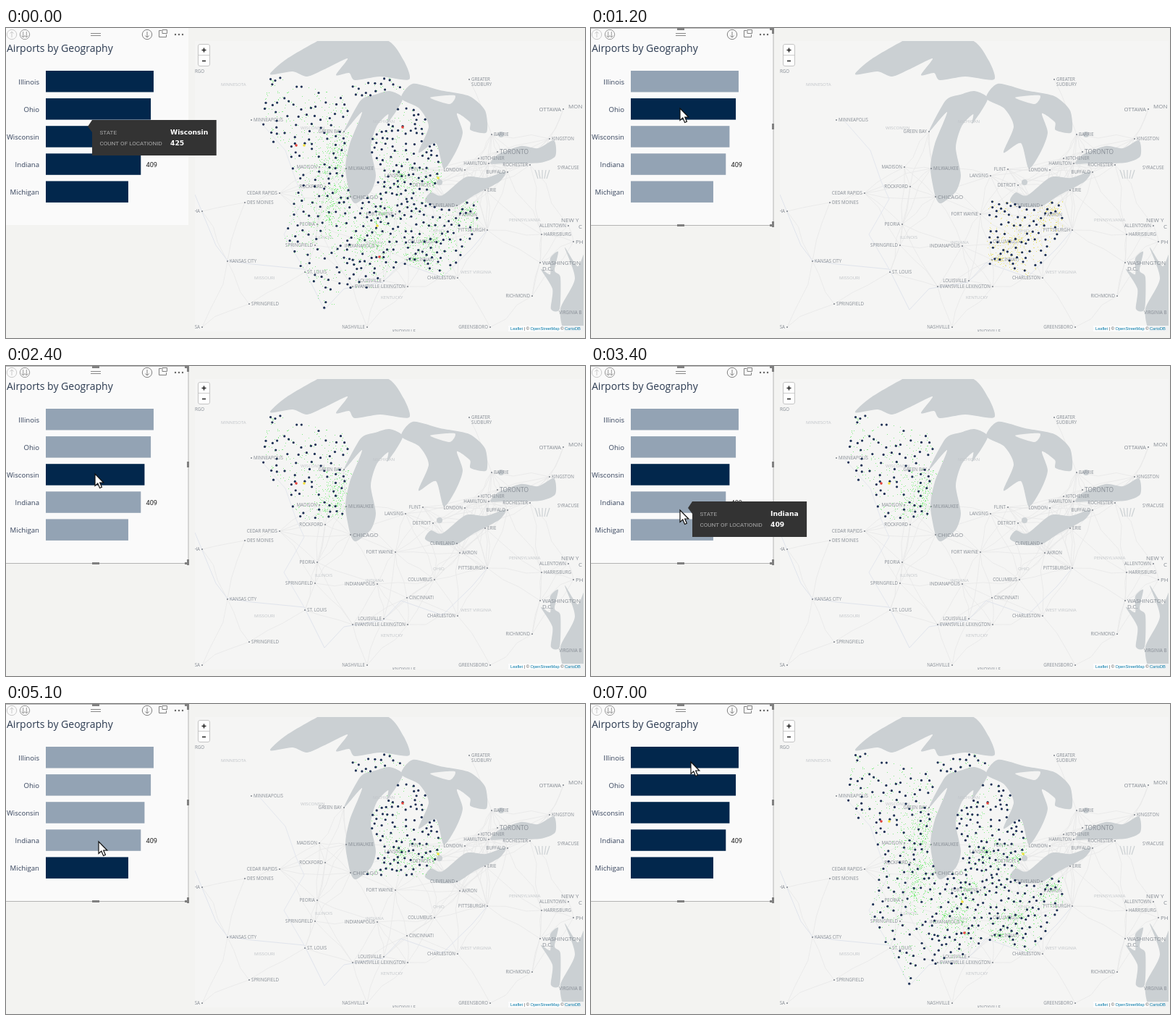
Recreate the animation shown at these times as an HTML page with a canvas. Size 800x428 px, loop 7.1 s.

```html
<!DOCTYPE html>
<html lang="en">
<head>
<meta charset="utf-8">
<title>Airports by Geography</title>
<style>
html, body { margin: 0; width: 100%; height: 100%; overflow: hidden; background: #f3f3f1; }
canvas { display: block; width: 800px; height: 428px; }
</style>
</head>
<body>
<canvas id="stage" width="800" height="428"></canvas>
<script>
const LOOP = 7100, STEP = 100;
const W = 800, H = 428, TAU = Math.PI * 2;
const NAVY = '#02274c', DIMMED = '#93a3b4', WATER = '#cbd0d3';
const GREEN = '#84ee84', YELLOW = '#ece474';
const SANS = '"Open Sans", sans-serif';
const ctx = document.getElementById('stage').getContext('2d');

function layer(draw) {
  const canvas = document.createElement('canvas');
  canvas.width = W;
  canvas.height = H;
  draw(canvas.getContext('2d'));
  return canvas;
}

function randomizer(seed) {
  return () => {
    seed = (seed + 0x6d2b79f5) | 0;
    let v = Math.imul(seed ^ (seed >>> 15), 1 | seed);
    v = (v + Math.imul(v ^ (v >>> 7), 61 | v)) ^ v;
    return ((v ^ (v >>> 14)) >>> 0) / 4294967296;
  };
}

const points = text => text.split(' ').map(p => p.split(',').map(Number));
const outline = (...rings) => new Path2D(rings.map(r => `M${r}Z`).join(' '));

// Closed Catmull-Rom curve through a few key points.
function shore(text) {
  const pts = points(text), n = pts.length, path = new Path2D();
  const at = i => pts[(i + n) % n];
  const handle = (a, b, c, k) => [0, 1].map(d => b[d] + k * (c[d] - a[d]) / 8);
  path.moveTo(...pts[0]);
  pts.forEach((p, i) => path.bezierCurveTo(
    ...handle(at(i - 1), p, at(i + 1), 1),
    ...handle(p, at(i + 1), at(i + 2), -1), ...at(i + 1)));
  return path;
}

function write(c, text, x, y, font, color, align = 'left') {
  c.font = font;
  c.fillStyle = color;
  c.textAlign = align;
  c.fillText(text, x, y);
}

function line(c, color, width, ...pts) {
  c.strokeStyle = color;
  c.lineWidth = width;
  c.beginPath();
  pts.forEach(([x, y]) => c.lineTo(x, y));
  c.stroke();
}

function disc(c, x, y, r, color) {
  c.fillStyle = color;
  c.beginPath();
  c.arc(x, y, r, 0, TAU);
  c.fill();
}

// ---- Geography ----

const waters = [
  '365,64 386,44 425,21 445,14 524,16 549,44 557,71 517,67 482,72 474,62 456,65 472,42 440,57 416,67 396,60',
  '476,233 484,242 504,226 511,203 504,165 512,136 528,119 527,132 548,98 530,87 510,92 490,100 467,143 492,116 475,160 469,194',
  '546,97 571,111 584,136 570,172 594,159 605,194 622,170 631,144 623,118 641,130 642,141 664,144 662,114 640,94 600,86 562,77',
  '579,239 587,227 603,231 635,206 663,207 690,198 682,212 645,232 623,246 598,247',
  '669,187 681,174 711,163 735,166 757,155 759,177 738,186 688,187',
  '763,309 758,335 766,344 765,388 753,388 755,360 739,333 752,340 752,318',
  '772,303 790,329 802,310 802,421 773,421 766,388 786,346'
].map(shore);
const island = shore('586,96 620,93 613,105');

// Outlines may overlap water; the scatter keeps dots on land.
const states = {
  Illinois: {
    count: 464, airports: 64, speck: YELLOW, hubs: points('457,222 446,262'),
    area: outline('401,212 478,211 481,244 481,300 467,358 450,387 438,386 384,290 392,259')
  },
  Ohio: {
    count: 452, airports: 76, speck: YELLOW, hubs: points('637,250 564,318 592,292'),
    area: outline('547,238 652,237 652,275 620,328 603,342 546,324')
  },
  Wisconsin: {
    count: 425, airports: 76, speck: GREEN, hubs: points('457,192 440,198 455,165'),
    area: outline('366,64 464,93 472,112 494,112 471,210 401,211 349,127 347,105')
  },
  Indiana: {
    count: 409, airports: 60, speck: GREEN, hubs: points('513,300 520,256 488,292'),
    area: outline('481,240 547,238 546,322 504,358 477,361 470,358 480,316')
  },
  Michigan: {
    count: 355, airports: 108, speck: GREEN, hubs: points('588,212 545,205'),
    area: outline('497,237 500,160 545,98 586,130 606,165 605,200 579,238', '470,78 545,66 556,84 490,99')
  }
};
const names = Object.keys(states);

const marks = [
  ['Wisconsin', 401, 162, '#e8403c'], ['Wisconsin', 412, 162, '#f2e03a'], ['Indiana', 513, 273, '#f2e03a'],
  ['Indiana', 516, 316, '#e8403c'], ['Michigan', 548, 137, '#e8403c'], ['Michigan', 597, 207, '#f2e03a']
];

function scatter({ area, hubs, count, airports }, random) {
  const onLand = ([x, y]) => ctx.isPointInPath(area, x, y) && !waters.some(w => ctx.isPointInPath(w, x, y));
  const anywhere = () => [345 + random() * 310, 45 + random() * 345];
  const nearHub = () => {
    const [x, y] = hubs[Math.floor(random() * hubs.length)];
    const r = 30 * random(), a = TAU * random();
    return [x + r * Math.cos(a), y + r * Math.sin(a)];
  };
  const fill = (total, pick, gap) => {
    const found = [];
    for (let tries = 0; found.length < total && tries < 20000; tries++) {
      const p = pick();
      if (onLand(p) && found.every(q => Math.hypot(q[0] - p[0], q[1] - p[1]) >= gap)) found.push(p);
    }
    return found;
  };
  return {
    specks: fill(count, () => random() < 0.13 ? nearHub() : anywhere(), 0),
    fields: fill(airports, anywhere, 6)
  };
}

function drawDots(c, name, speckColor) {
  const { specks, fields } = states[name].dots;
  c.fillStyle = speckColor;
  specks.forEach(([x, y]) => c.fillRect(Math.round(x), Math.round(y), 1, 1));
  fields.forEach(([x, y]) => disc(c, x, y, 1.6, '#1d3054'));
  marks.filter(m => m[0] === name).forEach(([, x, y, color]) => disc(c, x, y, 1.8, color));
}

// Name, marker position, side of the label, optional larger size.
const cities = [
  ['MINNEAPOLIS', 339, 127, 1], ['GREEN BAY', 467, 143, -1], ['MADISON', 433, 192, -1], ['MILWAUKEE', 470, 194, 1],
  ['ROCKFORD', 441, 219, -1], ['CHICAGO', 476, 233, 1, 8], ['CEDAR RAPIDS', 378, 228, -1], ['DES MOINES', 330, 241, 1],
  ['PEORIA', 430, 271, -1], ['FORT WAYNE', 538, 257, -1], ['INDIANAPOLIS', 513, 301, -1], ['SPRINGFIELD', 427, 300, -1],
  ['KANSAS CITY', 306, 322, 1], ['ST. LOUIS', 413, 337, 1], ['SPRINGFIELD', 336, 381, 1], ['NASHVILLE', 499, 413, -1],
  ['LOUISVILLE', 522, 349, -1], ['EVANSVILLE', 479, 357, 1], ['LEXINGTON', 555, 357, -1], ['CINCINNATI', 554, 320, 1],
  ['COLUMBUS', 592, 295, -1], ['CLEVELAND', 623, 245, -1], ['AKRON', 627, 258, 1], ['PITTSBURGH', 665, 279, -1],
  ['DETROIT', 590, 217, -1], ['FLINT', 576, 195, -1], ['LANSING', 552, 204, -1], ['LONDON', 634, 196, -1],
  ['ERIE', 662, 224, 1], ['BUFFALO', 693, 199, -1], ['HAMILTON', 667, 187, -1], ['KITCHENER', 653, 180, 1],
  ['TORONTO', 679, 171, 1, 8.4], ['ROCHESTER', 724, 189, -1], ['KINGSTON', 751, 153, 1], ['BARRIE', 671, 147, 1],
  ['OTTAWA', 770, 112, -1, 7.8], ['ALLENTOWN', 777, 273, -1], ['HARRISBURG', 740, 285, 1], ['PH', 784, 295, 1, 8],
  ['WASHINGTON', 738, 324, 1, 8], ['CHARLESTON', 624, 345, -1], ['RICHMOND', 727, 370, -1], ['GREENSBORO', 669, 413, -1],
  ['HA', 271, 253, -1], ['SA', 271, 413, -1], ['GREATER', 640, 71, 1]
];
const places = [
  ['RGO', 261, 62], ['SUDBURY', 643, 80], ['SYRACUSE', 762, 195], ['VIRGINIA B', 764, 395], ['KNOXVILLE', 534, 421],
  ['MON', 777, 111, 8], ['NEW Y', 767, 268, 8], ['C', 791, 277, 8], ['D.C.', 741, 335, 8]
];
const regions = [
  ['MINNESOTA', 297, 80], ['WISCONSIN', 407, 140], ['MICHIGAN', 507, 131], ['ILLINOIS', 427, 291], ['INDIANA', 497, 298],
  ['OHIO', 590, 282], ['MISSOURI', 343, 347], ['KENTUCKY', 518, 374], ['WEST VIRGINIA', 628, 339], ['PENNSYLVANIA', 695, 267]
];

function drawRoads(c, random) {
  cities.forEach(([, x, y], i) => cities.slice(i + 1).forEach(([, u, v]) => {
    const reach = Math.hypot(u - x, v - y);
    if (reach > 100 || reach < 12) return;
    const along = k => [x + (u - x) * k, y + (v - y) * k].map(p => p + (random() - 0.5) * reach * 0.12);
    line(c, '#e8e8e7', 0.8, [x, y], along(1 / 3), along(2 / 3), [u, v]);
  }));
}

function drawMap(c) {
  c.beginPath();
  c.rect(261, 18, 537, 401);
  c.clip();
  c.fillStyle = '#f5f5f4';
  c.fillRect(261, 18, 537, 401);
  drawRoads(c, randomizer(12));
  c.lineJoin = 'round';
  line(c, '#e0e4ec', 1, ...points('261,230 290,300 306,321 340,326 412,333 440,389 467,360 521,351 546,324 603,344 644,304 665,279'));
  line(c, '#e4e7ee', 1, ...points('349,127 386,169 401,212 412,236 384,285 412,333'));
  c.fillStyle = WATER;
  waters.forEach(w => c.fill(w));
  disc(c, 599, 213, 4, WATER);
  disc(c, 684, 147, 4, WATER);
  for (let i = 0; i < 5; i++) line(c, WATER, 1.2, [731 + i * 5, 196], [735 + i * 3, 208]);
  c.fillStyle = '#f3f3f2';
  c.fill(island);

  regions.forEach(([text, x, y]) => write(c, text, x, y, `6.1px ${SANS}`, '#c0c4c8'));
  cities.forEach(([text, x, y, side, size = 6.2]) => {
    disc(c, x, y, 1, '#7f858c');
    write(c, text, x + side * 3, y + size * 0.38, `${size}px ${SANS}`, '#868c94', side > 0 ? 'left' : 'right');
  });
  places.forEach(([text, x, y, size = 6.2]) => write(c, text, x, y, `${size}px ${SANS}`, '#868c94'));
}

function drawMapControls(c) {
  c.fillStyle = '#fff';
  c.strokeStyle = '#c4c4c4';
  c.lineWidth = 1;
  c.beginPath();
  c.roundRect(265.5, 22.5, 16, 30, 2.5);
  c.fill();
  c.stroke();
  line(c, '#ccc', 1, [266, 37.5], [281, 37.5]);
  line(c, '#222', 1.5, [270.5, 30.5], [276.5, 30.5]);
  line(c, '#222', 1.5, [273.5, 27.5], [273.5, 33.5]);
  line(c, '#222', 1.5, [271, 45.5], [276, 45.5]);

  c.fillStyle = 'rgba(255,255,255,.7)';
  c.fillRect(694, 411, 104, 8);
  let x = 697;
  ['Leaflet', ' | © ', 'OpenStreetMap', ' © ', 'CartoDB'].forEach((text, i) => {
    write(c, text, x, 417, '5.7px "Liberation Sans", sans-serif', i % 2 ? '#444' : '#0078a8');
    x += c.measureText(text).width;
  });
}

// ---- Chart card ----

const rowTop = i => 59 + i * 38.1;

function arrow(c, x, dir, color) {
  line(c, color, 1, [x, 5], [x, 13]);
  line(c, color, 1, [x - 2.5, 9 + dir * 1.5], [x, 9 + dir * 4], [x + 2.5, 9 + dir * 1.5]);
}

function roundButton(c, x, color, dir, ...offsets) {
  c.strokeStyle = color;
  c.lineWidth = 1;
  c.beginPath();
  c.arc(x, 9, 6.7, 0, TAU);
  c.stroke();
  offsets.forEach(dx => arrow(c, x + dx, dir, color));
}

function drawCard(c) {
  c.fillStyle = '#fafafa';
  c.fillRect(0, 0, 252, 272);
  roundButton(c, 8, '#c9c9c9', -1, 0);
  roundButton(c, 26, '#999', 1, -2.3, 2.3);
  roundButton(c, 195, '#808080', 1, 0);
  [7.5, 10.5].forEach(y => line(c, '#888', 1, [117, y], [131, y]));
  line(c, '#808080', 1, [215, 3.5], [211.5, 3.5], [211.5, 12.5], [221.5, 12.5], [221.5, 9]);
  line(c, '#808080', 1, [216, 2.5], [222.5, 2.5], [222.5, 7.5], [216, 7.5], [216, 2.5]);
  [234, 239, 244].forEach(x => disc(c, x, 9, 1.2, '#666'));
  write(c, 'Airports by Geography', 1, 33, `14px ${SANS}`, '#2b3a50');
  names.forEach((name, i) => write(c, name, 46, rowTop(i) + 19, `9.6px ${SANS}`, '#33415a', 'right'));
  write(c, '409', 193.5, 192, '9.2px Roboto, sans-serif', '#222');
}

function drawFrame(c) {
  line(c, '#b4b4b4', 1, [0, 0.5], [252, 0.5], [252, 272.5], [0, 272.5]);
  c.fillStyle = '#808080';
  [0, 271].forEach(y => {
    c.fillRect(119, y, 10, 3);
    c.fillRect(247, y, 6, 3);
  });
  [0, 132, 267].forEach(y => c.fillRect(250, y, 3, 8));
}

function drawBars(selected) {
  names.forEach((name, i) => {
    ctx.fillStyle = !selected || selected === name ? NAVY : DIMMED;
    ctx.fillRect(55, rowTop(i), states[name].count * 0.321, 29.5);
  });
}

function drawTooltip(name, x, y) {
  const bold = 'bold 9.2px "DejaVu Sans", sans-serif';
  ctx.font = bold;
  const width = 119.5 + ctx.measureText(name).width;
  ctx.fillStyle = '#333';
  ctx.fillRect(x, y, width, 49);
  ctx.fill(outline(`${x},${y} ${x - 6},${y + 9} ${x},${y + 17}`));
  [['STATE', name], ['COUNT OF LOCATIONID', states[name].count]].forEach(([label, value], i) => {
    const base = y + 20 + i * 14.5;
    write(ctx, label, x + 10.5, base, '8.1px Roboto, sans-serif', '#a9a9a9');
    write(ctx, value, x + 108, base, bold, '#fff');
  });
}

const arrowhead = outline('0,0 0,16.5 3.8,13 6.6,19.5 9.4,18.2 6.7,12 11.8,12');

function drawPointer(x, y) {
  ctx.save();
  ctx.translate(x, y);
  ctx.fillStyle = '#fff';
  ctx.strokeStyle = '#111';
  ctx.lineWidth = 1.2;
  ctx.fill(arrowhead);
  ctx.stroke(arrowhead);
  ctx.restore();
}

// ---- Timeline ----

const TRAVEL = 300, MAP_DELAY = 200, CLEAR = 6600;
const stops = [
  { state: 'Wisconsin', at: 0, leave: 300, x: 102, y: 139 },
  { state: 'Ohio', at: 500, click: 600, leave: 1100, x: 123, y: 111 },
  { state: 'Wisconsin', at: 2000, click: 2100, leave: 2300, x: 123, y: 149 },
  { state: 'Indiana', at: 3300, click: 3600, leave: 3900, x: 123, y: 199 },
  { state: 'Michigan', at: 4300, click: 4600, leave: 5000, x: 124, y: 229 },
  { state: 'Illinois', at: 5300, click: 5400, leave: CLEAR, x: 138, y: 80 }
];

function selectionAt(t) {
  const last = stops.filter(s => s.click <= t).pop();
  return last && t < CLEAR ? last.state : null;
}

function pointerAt(t) {
  let { x, y } = stops[0];
  stops.forEach(s => {
    const k = Math.min(1, Math.max(0, 1 - (s.at - t) / TRAVEL));
    const ease = k * k * (3 - 2 * k);
    x += (s.x - x) * ease;
    y += (s.y - y) * ease;
  });
  return [Math.round(x), Math.round(y)];
}

names.forEach((name, i) => {
  const s = states[name];
  s.dots = scatter(s, randomizer(40 + i));
  s.view = layer(c => drawDots(c, name, s.speck));
});
const allStates = layer(c => names.forEach(name => drawDots(c, name, GREEN)));
const [baseMap, controls, card, frame] = [drawMap, drawMapControls, drawCard, drawFrame].map(layer);

function render(t) {
  ctx.fillStyle = '#f3f3f1';
  ctx.fillRect(0, 0, W, H);
  const shown = selectionAt(t - MAP_DELAY);
  const dots = shown ? states[shown].view : allStates;
  [baseMap, dots, controls, card].forEach(image => ctx.drawImage(image, 0, 0));
  if (t >= stops[1].click) ctx.drawImage(frame, 0, 0);
  drawBars(selectionAt(t));
  const hover = stops.find(s => t >= s.at && t < s.leave);
  if (hover) drawTooltip(hover.state, hover.x + 17, hover.y - 12);
  if (t >= STEP) drawPointer(...pointerAt(t));
}

function tick() {
  render(Math.floor((performance.now() % LOOP) / STEP) * STEP);
  requestAnimationFrame(tick);
}
tick();
</script>
</body>
</html>
```
